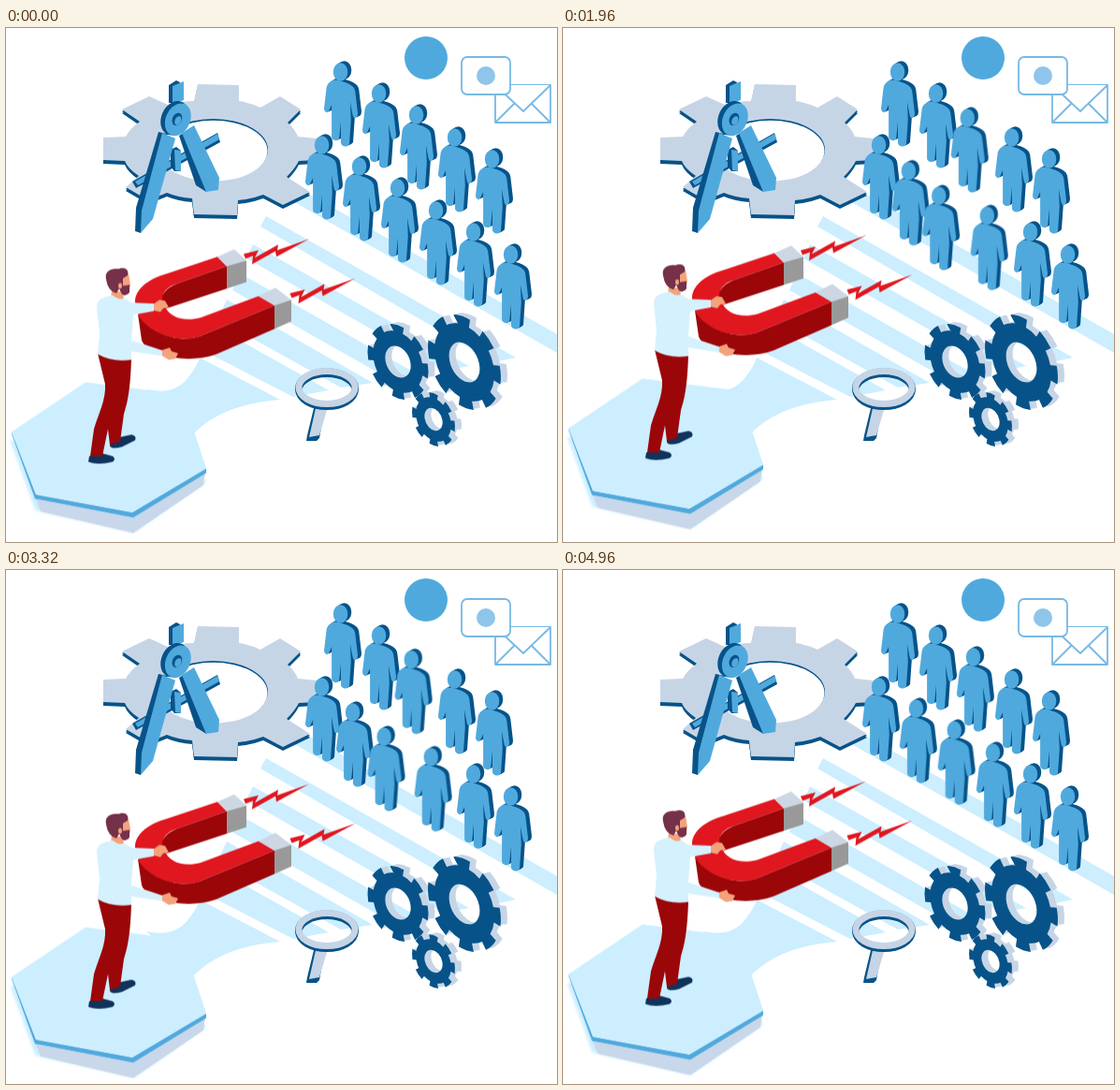
These frames come from a looping animation (589 px wide and 549 px high, 5 s). An HTML page without scripts:

```html
<!DOCTYPE html>
<html lang="en">
<head>
<meta charset="utf-8">
<title>Attracting an audience</title>
<style>
  html, body { margin: 0; width: 100%; height: 100%; overflow: hidden; background: #fff; }
  svg { display: block; width: 100vw; height: 100vh; }
  .sky { fill: #cef }
  .blue { fill: #50a9dd }
  .navy { fill: #075389 }
  .steel { fill: #c6d5e6 }
  .red { fill: #e0171f }
  .maroon { fill: #9b0609 }
  .shirt { fill: #d5f1fe }
  .skin { fill: #f3a27b }
  .shoe { fill: #10335a }
  .line { fill: #fff; stroke: #78b9e4; stroke-width: 1.8; stroke-linejoin: round }

  .bob { animation: bob 5s -1.4s infinite cubic-bezier(.37, 0, .63, 1) }
  @keyframes bob {
    0%, 100% { transform: translateY(4px) }
    60% { transform: translateY(-4.2px) }
  }
  .pull { animation: pull 2.5s linear infinite alternate }
  @keyframes pull { to { transform: translate(var(--dx), var(--dy)) } }
</style>
</head>
<body>
<svg viewBox="0 0 589 549" preserveAspectRatio="none">
  <defs>
    <g id="shape" transform="scale(.9 1)">
      <ellipse cx="19.5" cy="11" rx="8.6" ry="9.8"/>
      <path d="M8 21C12 18 17 20 21 21C28 23 36 25 37 32L40 55C40 61 35 62 34 57L31 43L32 62L30 88C27 92 21 91 20 87V64L18 82C16 86 9 84 9 80V46L6 52C5 56 0 54 0 50L3 27C4 24 6 22 8 21Z"/>
    </g>
    <g id="person">
      <use href="#shape" x="4" y="-2" class="navy"/>
      <use href="#shape" x="2" y="-1" class="navy"/>
      <use href="#shape" class="blue"/>
    </g>
    <g id="cog" fill="none" transform="rotate(21)">
      <circle r="62" stroke-width="40"/>
      <circle r="89" stroke-width="22" pathLength="16" stroke-dasharray="1.05 .95"/>
    </g>
    <path id="bolt" d="M254 241L270 237L266 245L291 231L290 237L324 225L289 244L288 238L263 252L264 243L256 246Z"/>
    <path id="wheel" d="M201 78L205 60L249 61V78Q262 80 272 85L293 73L315 87L301 101Q309 108 312 116L332 118V141L313 142Q309 150 300 159L325 175L296 189L275 178Q262 183 248 184L247 200L201 199L199 182Q184 181 172 176L152 184L128 170L142 158Q130 150 127 142L104 141V117L128 116Q133 107 143 100L124 87L153 73L173 82Q187 78 201 78Z"/>
    <filter id="soft"><feGaussianBlur stdDeviation="1.5"/></filter>
  </defs>
  <rect width="589" height="549" fill="#fff"/>

  <!-- light rays -->
  <g class="sky">
    <path d="M305 184L325 178L589 327V347Z"/>
    <path d="M278 201L545 352L522 357L272 212Z"/>
    <path d="M264 231L495 361L469 366L257 246Z"/>
    <path d="M250 262L440 370L410 375L242 280Z"/>
    <path d="M236 290L392 379L358 384L226 311Z"/>
    <path d="M222 318L345 387L307 394L206 342Z"/>
    <path d="M150 386Q180 393 195 373Q205 360 207 352L293 397Q230 402 200 434Z"/>
  </g>

  <!-- large wheel and compass -->
  <use href="#wheel" y="4" class="navy"/>
  <use href="#wheel" y="2" class="navy"/>
  <use href="#wheel" class="steel"/>
  <ellipse class="navy" cx="221.5" cy="130" rx="58.5" ry="33"/>
  <ellipse cx="221.5" cy="131.3" rx="58" ry="32.5" fill="#fff"/>
  <path class="navy" d="M135 164L226 112L229 122L139 171Z"/>
  <path class="blue" d="M138 164L226 113L228 119L141 168Z"/>
  <path class="navy" d="M176 130L182 127L187 131V153L180 153L176 148Z"/>
  <path class="blue" d="M180 130L187 131V153L181 152Z"/>
  <path class="navy" d="M163 111L172 113L150 196L144 219L138 217L139 192Z"/>
  <path class="blue" d="M167 112L181 118L157 204L144 219L145 195Z"/>
  <path class="navy" d="M185 115L190 112L212 163L214 175L203 168Z"/>
  <path class="blue" d="M188 112L201 104L228 160L227 173L214 175L209 163Z"/>
  <path class="navy" d="M174 61L182 56L186 58L182 80H174Z"/>
  <path class="blue" d="M178 62L190 57V77L178 81Z"/>
  <g transform="rotate(24 182 97)">
    <ellipse class="navy" cx="180" cy="97" rx="14" ry="19"/>
    <ellipse class="blue" cx="184" cy="97" rx="13" ry="18"/>
    <ellipse class="navy" cx="183" cy="97" rx="5" ry="7"/>
    <ellipse class="blue" cx="184.5" cy="98" rx="3.3" ry="5"/>
  </g>

  <!-- crowd -->
  <use href="#person" x="340" y="36"/>
  <use href="#person" x="381" y="59"/>
  <g class="pull" style="--dx:-8px;--dy:4px"><use href="#person" x="421" y="82"/></g>
  <use href="#person" x="462" y="106"/>
  <use href="#person" x="502" y="129"/>
  <use href="#person" x="320" y="114"/>
  <g class="pull" style="--dx:-10.5px;--dy:6px"><use href="#person" x="360" y="137"/></g>
  <g class="pull" style="--dx:-21.5px;--dy:10.5px"><use href="#person" x="401" y="160"/></g>
  <g class="pull" style="--dx:-8px;--dy:7px"><use href="#person" x="442" y="184"/></g>
  <use href="#person" x="482" y="207"/>
  <use href="#person" x="522" y="231"/>

  <!-- cogs -->
  <defs>
    <g id="cogs">
      <use href="#cog" transform="translate(419 356.5) rotate(-25) scale(.299 .425)"/>
      <use href="#cog" transform="translate(490 357) rotate(-25) scale(.349 .539)"/>
      <use href="#cog" transform="translate(457 418) rotate(-25) scale(.21 .305)"/>
    </g>
  </defs>
  <g stroke="#c6d5e6">
    <use href="#cogs" x="7" y="-2"/><use href="#cogs" x="5" y="-1.5"/><use href="#cogs" x="2.5" y="-1"/>
  </g>
  <use href="#cogs" stroke="#075389"/>

  <!-- magnifier -->
  <path class="navy" d="M330 402L341 405L335 438L332 441L321 441L322 435Z"/>
  <path class="steel" d="M332 402L344 405L335 435L324 437Z"/>
  <g fill="none" stroke-width="7">
    <ellipse cx="343" cy="387" rx="30" ry="17.5" stroke="#075389"/>
    <ellipse cx="343" cy="385" rx="30.5" ry="18" stroke="#075389"/>
    <ellipse cx="343" cy="384" rx="30" ry="17.5" stroke="#c6d5e6"/>
  </g>

  <!-- contact icons -->
  <circle class="blue" cx="449" cy="32" r="23"/>
  <g class="line">
    <path d="M523 61H582V101H523ZM523 101L544 80M582 101L561 80"/>
    <path d="M523 61L553 89L582 61"/>
    <rect x="487" y="31" width="52" height="40" rx="6"/>
  </g>
  <circle cx="513" cy="51" r="10" fill="#8fc5ea"/>

  <!-- platform, man and magnet -->
  <g class="bob">
    <path d="M8 440L34 512L136 535L212 482" fill="none" stroke="#cef" stroke-width="7" filter="url(#soft)"/>
    <path fill="#c8d7ea" d="M32 503L135 522L213 474L211 488L136 539L37 516Z"/>
    <path class="blue" d="M6 431L32 498L135 517L214 470V475L136 522.5L31 502.5L6 433Z"/>
    <path class="sky" d="M6 431L85 378L188 391L214 470L135 516.5L32 497.5Z"/>

    <path class="shoe" d="M111 439L120 437L134 434Q140 435 138 440L124 447Q113 450 111 446Z"/>
    <path class="shoe" d="M89 457L103 454L114 457Q118 460 114 463Q98 467 88 463Z"/>
    <path class="maroon" d="M98 347L134 353C133 385 130 400 126 412L122 441L111 445L109 428L103 457L90 457L94 428C99 411 107 397 106 380Z"/>

    <path class="red" d="M226 244L172 262C150 268 138 280 138 292C138 300 141 303 142 308C150 325 185 337 207 329L287 296L270 286L208 309C190 314 172 308 170 295L168 285C170 278 176 275 182 273L236 254Z"/>
    <path class="maroon" d="M236 254L182 273C172 277 166 284 167 290L172 299L236 278Z"/>
    <path class="maroon" d="M141 305C150 325 185 337 207 329L287 296V321L225 348C192 360 150 348 145 333Z"/>
    <g fill="#ccd7e3">
      <path d="M226 244L244 236L257 248L236 254Z"/>
      <path d="M270 286L288 277L305 290L287 296Z"/>
    </g>
    <g fill="#999">
      <path d="M236 254L257 248V271L236 278Z"/>
      <path d="M287 296L305 290V313L287 321Z"/>
    </g>
    <use href="#bolt" class="red"/>
    <use href="#bolt" class="red" x="49.5" y="42"/>

    <path class="skin" d="M157 295L164 290L170 291L174 298L168 299L165 303L157 301Z"/>
    <path class="skin" d="M166 344L175 341L177 345L184 347L181 353L174 354L166 349Z"/>
    <path class="skin" d="M113 279L125 282L126 290L112 290Z"/>
    <path class="shirt" d="M97 298Q97 289 106 287L114 285Q121 291 126 288L134 293L158 294V302L136 306L134 333L167 344V350L134 345L134 354Q114 357 98 348L100 326Z"/>
    <path class="skin" d="M122 263L131 262L133 274L131 284L122 283Z"/>
    <path fill="#75304a" d="M107 268C105 259 113 256 120 257C127 254 132 258 130 264L125 267L125 275L132 274V282Q128 287 124 284L121 278L118 283Q109 281 107 268Z"/>
    <ellipse class="skin" cx="122" cy="275" rx="2" ry="3"/>
  </g>
</svg>
</body>
</html>
```
